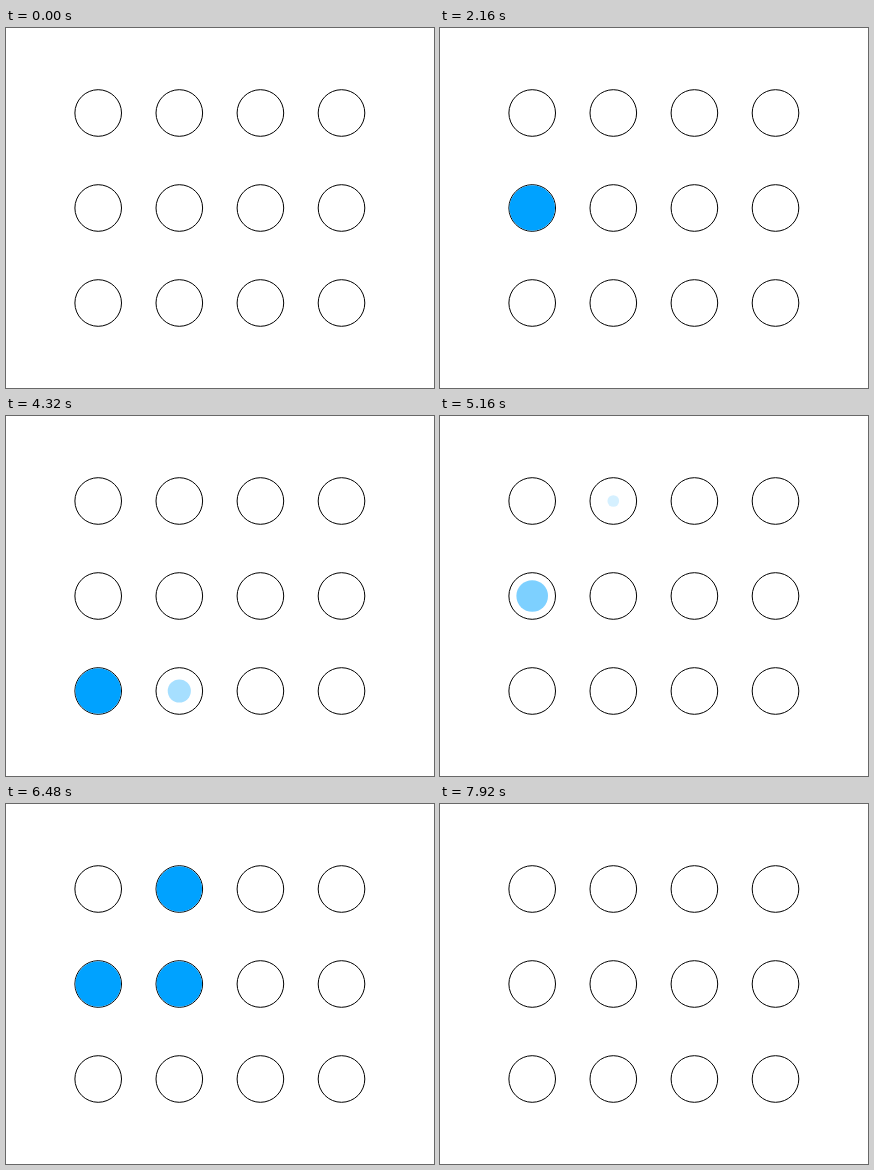
An HTML page with a canvas that plays this animation: 428 px wide and 360 px high, repeating every 7960 ms.

```html
<!DOCTYPE html>
<html lang="en">
<head>
<meta charset="utf-8">
<title>Dot grid</title>
<style>
html, body { margin: 0; width: 428px; height: 360px; overflow: hidden; background: #fff; }
canvas { display: block; }
</style>
</head>
<body>
<canvas id="stage" width="428" height="360"></canvas>
<script>
const ctx = document.getElementById('stage').getContext('2d');
const LOOP = 7960, STEP = 40, COLS = 4, ROWS = 3;
const GROW = 17 * STEP;
const presses = [];
let clock = 0;

const wait = ms => { clock += ms; };

function press(...cells) {
  for (const cell of cells) presses.push({ cell, start: clock, end: LOOP });
}

function releaseAll() {
  for (const p of presses) p.end = Math.min(p.end, clock);
}

// single tap
wait(2 * STEP);
press(0);
wait(GROW);
releaseAll();

// long press
wait(760);
press(4);
wait(1400);
releaseAll();

// two at once
wait(STEP);
press(2, 3);
wait(GROW);
releaseAll();

// one after the other
wait(STEP);
press(8);
wait(440);
press(9);
wait(GROW);
releaseAll();

// chord whose first dot moves across
wait(STEP);
press(4);
const mover = presses.at(-1);
wait(280);
press(1);
wait(720);
press(5);
wait(960);
mover.end = clock;
press(6);
wait(1120);
releaseAll();

function circle(cell, r) {
  const col = cell % COLS, row = Math.floor(cell / COLS);
  ctx.beginPath();
  ctx.arc(92.2 + col * 81.1, 85 + row * 95, r, 0, Math.PI * 2);
}

function draw(now) {
  const t = Math.floor(now % LOOP / STEP) * STEP;
  ctx.globalAlpha = 1;
  ctx.fillStyle = '#fff';
  ctx.fillRect(0, 0, 428, 360);

  ctx.strokeStyle = '#000';
  ctx.lineWidth = 1;
  for (let cell = 0; cell < COLS * ROWS; cell++) {
    circle(cell, 23.3);
    ctx.stroke();
  }

  ctx.fillStyle = '#00a2ff';
  for (const { cell, start, end } of presses) {
    if (t < start || t >= end) continue;
    const p = Math.min(1, (t - start + STEP) / GROW);
    const alpha = 0.1 + 0.9 * p ** 1.24;
    ctx.globalAlpha = alpha;
    circle(cell, 22.8 * (1 - (1 - alpha) ** 1.66));
    ctx.fill();
  }
}

const origin = performance.now();
function tick() {
  draw(performance.now() - origin);
  requestAnimationFrame(tick);
}
tick();
</script>
</body>
</html>
```
